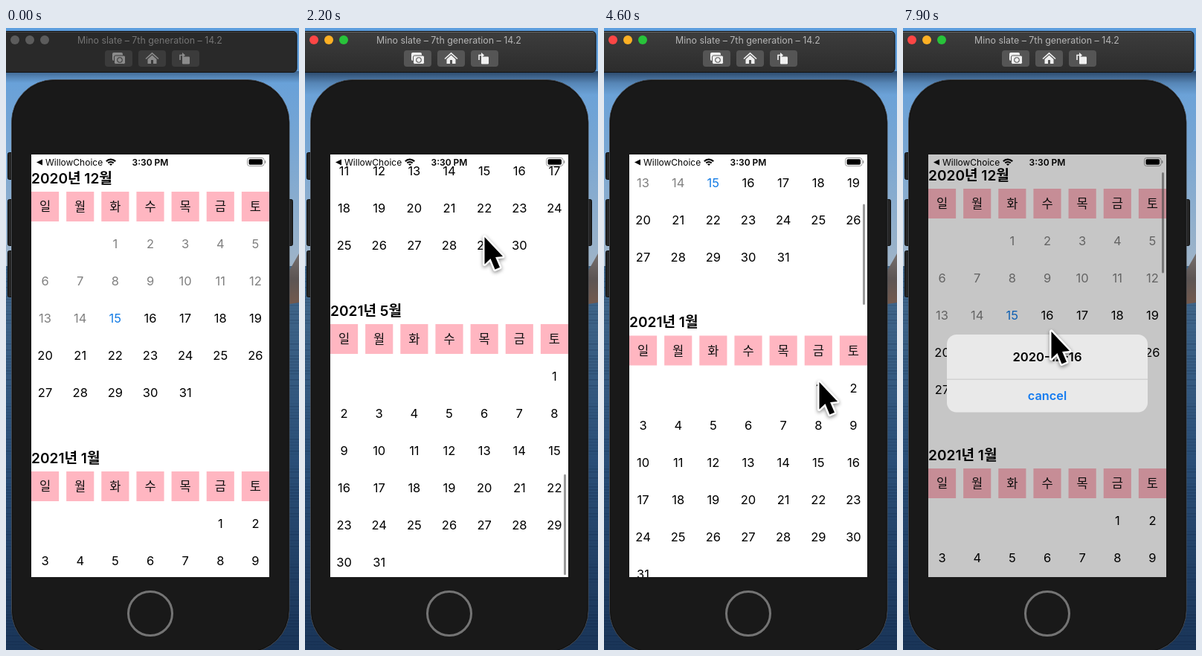
Write an HTML page with a canvas that moves like this. It is 394 px wide and 836 px high and loops after 8 s.

```html
<!DOCTYPE html>
<html lang="ko">
<head>
<meta charset="utf-8">
<style>
html, body { margin: 0; width: 100%; height: 100%; overflow: hidden; background: #181818; }
canvas { display: block; width: 394px; height: 836px; }
</style>
</head>
<body>
<canvas id="stage"></canvas>
<script>
const W = 394, H = 836, LOOP = 8000, STEP = 100;
const FONT = 'Inter, "Noto Sans CJK KR", "Noto Sans CJK JP", sans-serif';
const SCREEN = { x: 34, y: 170, w: 320, h: 568 };
const COL = 330 / 7, CELL = COL - 10, ROW = 50, MONTH = 376, MONTHS = 6, TODAY = 15;
const WEEK = [...'일월화수목금토'];

const canvas = document.getElementById('stage');
const c = canvas.getContext('2d');
const dpr = window.devicePixelRatio || 1;
canvas.width = W * dpr;
canvas.height = H * dpr;

// Ends of the hand gestures: time, pointer and list offset
const poses = [
  { t: 100, x: 404, y: 730, scroll: 0 },
  { t: 500, x: 290, y: 704, scroll: 0 },
  { t: 1100, x: 285, y: 262, scroll: 442 },
  { t: 2200, x: 241, y: 280, scroll: 1702 },
  { t: 3000, x: 244, y: 620, scroll: 386 },
  { t: 3900, x: 270, y: 640, scroll: 0 },
  { t: 4600, x: 289, y: 475, scroll: 182.5 },
  { t: 6700, x: 207, y: 392, scroll: 179 },
  { t: 7400, x: 199, y: 407, scroll: 4 }
];

const clamp = v => Math.min(1, Math.max(0, v));

// Monotone cubic through the poses: rests at turning points, flows through the others
function at(key, t) {
  const last = poses.length - 1;
  const slope = i => (poses[i + 1][key] - poses[i][key]) / (poses[i + 1].t - poses[i].t);
  const tangent = i => {
    if (i === 0 || i === last) return 0;
    const a = slope(i - 1), b = slope(i);
    return a * b <= 0 ? 0 : 2 * a * b / (a + b);
  };
  let i = 0;
  while (i < last - 1 && poses[i + 1].t < t) i++;
  const p = poses[i], q = poses[i + 1], d = q.t - p.t;
  const u = clamp((t - p.t) / d), v = 1 - u;
  return p[key] * v * v * (1 + 2 * u) + q[key] * u * u * (3 - 2 * u) +
    d * u * v * (tangent(i) * v - tangent(i + 1) * u);
}

function trace(points) {
  c.beginPath();
  points.forEach(([x, y]) => c.lineTo(x, y));
}

function poly(points, fill) {
  trace(points);
  c.closePath();
  c.fillStyle = fill;
  c.fill();
}

function rect(x, y, w, h, fill) {
  c.fillStyle = fill;
  c.fillRect(x, y, w, h);
}

function box(x, y, w, h, r, fill, stroke, line = 1) {
  c.beginPath();
  c.roundRect(x, y, w, h, r);
  if (fill) { c.fillStyle = fill; c.fill(); }
  if (stroke) { c.strokeStyle = stroke; c.lineWidth = line; c.stroke(); }
}

const disc = (x, y, r, fill) => box(x - r, y - r, 2 * r, 2 * r, r, fill);

// y is the middle of the capitals
function text(s, x, y, size, weight, fill, align = 'center') {
  c.font = `${weight} ${size}px ${FONT}`;
  c.textAlign = align;
  c.fillStyle = fill;
  c.fillText(s, x, y + size * 0.364);
}

function fade(y0, y1, ...colors) {
  const g = c.createLinearGradient(0, y0, 0, y1);
  colors.forEach((color, i) => g.addColorStop(i / (colors.length - 1), color));
  return g;
}

function wallpaper(active) {
  const horizon = 320;
  rect(0, 0, W, horizon, fade(0, horizon, '#5c9ddd', '#78a6d3', '#9fb4c8'));
  rect(0, horizon, W, H - horizon, fade(horizon, H, '#446a8d', '#2a4f78', '#1a3558'));
  for (let y = horizon; y < H; y += 4) {
    rect(0, y, W, 1.5, `rgba(8,25,55,${0.12 + 0.1 * Math.sin(y * y)})`);
  }
  poly([[381, 326], [W, 303], [W, 369], [381, 371]], fade(303, 371, '#77706e', '#5c5554', '#73594d'));
  const depth = active ? 32 : 16;
  rect(0, 58, W, depth, fade(58, 58 + depth, `rgba(0,8,25,${active ? 0.6 : 0.4})`, 'rgba(0,8,25,0.18)', 'rgba(0,8,25,0)'));
}

function toolbar(active) {
  const back = active ? '#555' : '#3b3b3b', ink = active ? '#f0f0f0' : '#8b8b8b';
  box(-4, 4.5, 395, 55, 5, active ? fade(4, 60, '#3d3d3d', '#2c2c2c') : '#292929', '#111');
  rect(0, 5, 388, 1, active ? '#6a6a6a' : '#454545');
  ['#fc4645', '#fdb024', '#28c33a'].forEach(
    (color, i) => disc(12 + 20 * i, 16, 6, active ? color : '#5c5c5c'));
  text('Mino slate – 7th generation – 14.2', 193.5, 16.5, 12.4, 400, active ? '#b6b6b6' : '#747474');
  for (let i = 0; i < 3; i++) box(133 + 45 * i, 30, 37, 22, 4, back);

  // camera
  box(143, 33, 14, 11, 2, ink);
  box(145.5, 37, 15, 11.5, 2, ink, back);
  disc(153, 43, 3.8, back);
  disc(153, 43, 2.7, ink);
  // house
  c.strokeStyle = ink;
  c.lineWidth = 1.6;
  trace([[188, 41.5], [196.5, 33.8], [205, 41.5]]);
  c.stroke();
  poly([[190.5, 42], [196.5, 36.6], [202.5, 42], [202.5, 48], [190.5, 48]], ink);
  rect(195, 43, 3, 5, back);
  // rotate
  box(237, 38.5, 10, 10, 1.2, ink);
  trace([[234, 43], [234, 36.5], [238, 36.5]]);
  c.stroke();
  poly([[237, 33], [241, 36.5], [237, 40]], ink);
}

function phone() {
  const key = (x, y, h) => box(x, y + 0.5, 8, h, 2, '#252525', '#0d0d0d');
  key(2.5, 167, 36);
  key(2.5, 230, 62);
  key(2.5, 299, 62);
  key(377.5, 230, 62);
  box(7.5, 69.5, 373.5, 770, 57, '#191919', '#45484d');
  box(8.5, 70.5, 371.5, 768, 56, null, '#101010');
  box(164.5, 757.5, 59, 59, 29.5, null, '#747474', 3);
}

function month(index, top) {
  const date = new Date(2020, 11 + index, 1);
  const year = date.getFullYear(), m = date.getMonth();
  const first = date.getDay(), days = new Date(year, m + 1, 0).getDate();
  const middle = i => SCREEN.x + COL * (i % 7) + CELL / 2;
  text(`${year}년 ${m + 1}월`, SCREEN.x, top, 19.1, 600, '#000', 'left');
  WEEK.forEach((name, i) => {
    rect(SCREEN.x + COL * i, top + 18, CELL, 40, '#ffb6c1');
    text(name, middle(i), top + 38, 16.5, 400, '#111');
  });
  for (let d = 1; d <= days; d++) {
    const cell = first + d - 1;
    const color = index || d > TODAY ? '#000' : d === TODAY ? '#147ce5' : '#808080';
    text(d, middle(cell), top + 88 + ROW * Math.floor(cell / 7), 16.5, 400, color);
  }
}

function statusBar() {
  poly([[41, 180.5], [49, 176.5], [49, 184.5]], '#000');
  text('WillowChoice', 53, 180.5, 12, 400, '#000', 'left');
  text('3:30 PM', 194, 180.5, 12, 600, '#000');
  c.strokeStyle = '#000';
  c.lineWidth = 2.2;
  for (let r = 1.6; r < 9; r += 3.4) {
    c.beginPath();
    c.arc(141, 185, r, -Math.PI * 0.76, -Math.PI * 0.24);
    c.stroke();
  }
  box(324.5, 174.5, 22.5, 11, 3, null, '#999');
  box(326.5, 176.3, 18.5, 7.4, 1.6, '#000');
  box(348, 178, 1.4, 4, 0.7, '#999');
}

function alertBox(t) {
  const k = clamp((t - 7500) / 300), cx = 194, cy = 464.5;
  if (!k) return;
  rect(SCREEN.x, SCREEN.y, SCREEN.w, SCREEN.h, `rgba(0,0,0,${0.224 * k})`);
  const size = 1 + 0.15 * (1 - k) ** 2;
  c.save();
  c.globalAlpha = k;
  c.translate(cx, cy);
  c.scale(size, size);
  box(-135, -52.5, 270, 104.5, 13, '#e9e9e9');
  rect(-135, 7.2, 270, 0.8, '#bcbcbc');
  text('2020-12-16', 0, -22.5, 16.6, 600, '#000');
  text('cancel', 0, 30, 16.3, 600, '#147bf0');
  c.restore();
}

function cursor(x, y) {
  c.save();
  c.translate(x + 0.5, y + 1);
  trace([[0, 0], [0, 36.5], [8, 29], [14, 43.5], [20.5, 40.8], [14.6, 27], [24.5, 26]]);
  c.closePath();
  c.shadowColor = 'rgba(0,0,0,0.45)';
  c.shadowBlur = 5 * dpr;
  c.shadowOffsetY = 2 * dpr;
  c.strokeStyle = '#fff';
  c.lineWidth = 5;
  c.lineJoin = 'round';
  c.stroke();
  c.shadowColor = 'transparent';
  c.fillStyle = '#000';
  c.fill();
  c.restore();
}

function draw(t) {
  const active = t >= 100, scroll = at('scroll', t);
  c.setTransform(dpr, 0, 0, dpr, 0, 0);
  wallpaper(active);
  toolbar(active);
  phone();

  c.save();
  c.beginPath();
  c.rect(SCREEN.x, SCREEN.y, SCREEN.w, SCREEN.h);
  c.clip();
  rect(SCREEN.x, SCREEN.y, SCREEN.w, SCREEN.h, '#fff');
  for (let i = 0; i < MONTHS; i++) month(i, 202 + MONTH * i - scroll);
  if (scroll > 0) box(348, 193 + 0.239 * scroll, 3, 135.5, 1.5, 'rgba(90,90,90,0.62)');
  statusBar();
  alertBox(t);
  c.restore();

  if (active) cursor(at('x', t), at('y', t));
}

const start = performance.now();
function tick() {
  const t = (performance.now() - start) % LOOP;
  draw(Math.floor(t / STEP) * STEP);
  requestAnimationFrame(tick);
}
tick();
</script>
</body>
</html>
```
